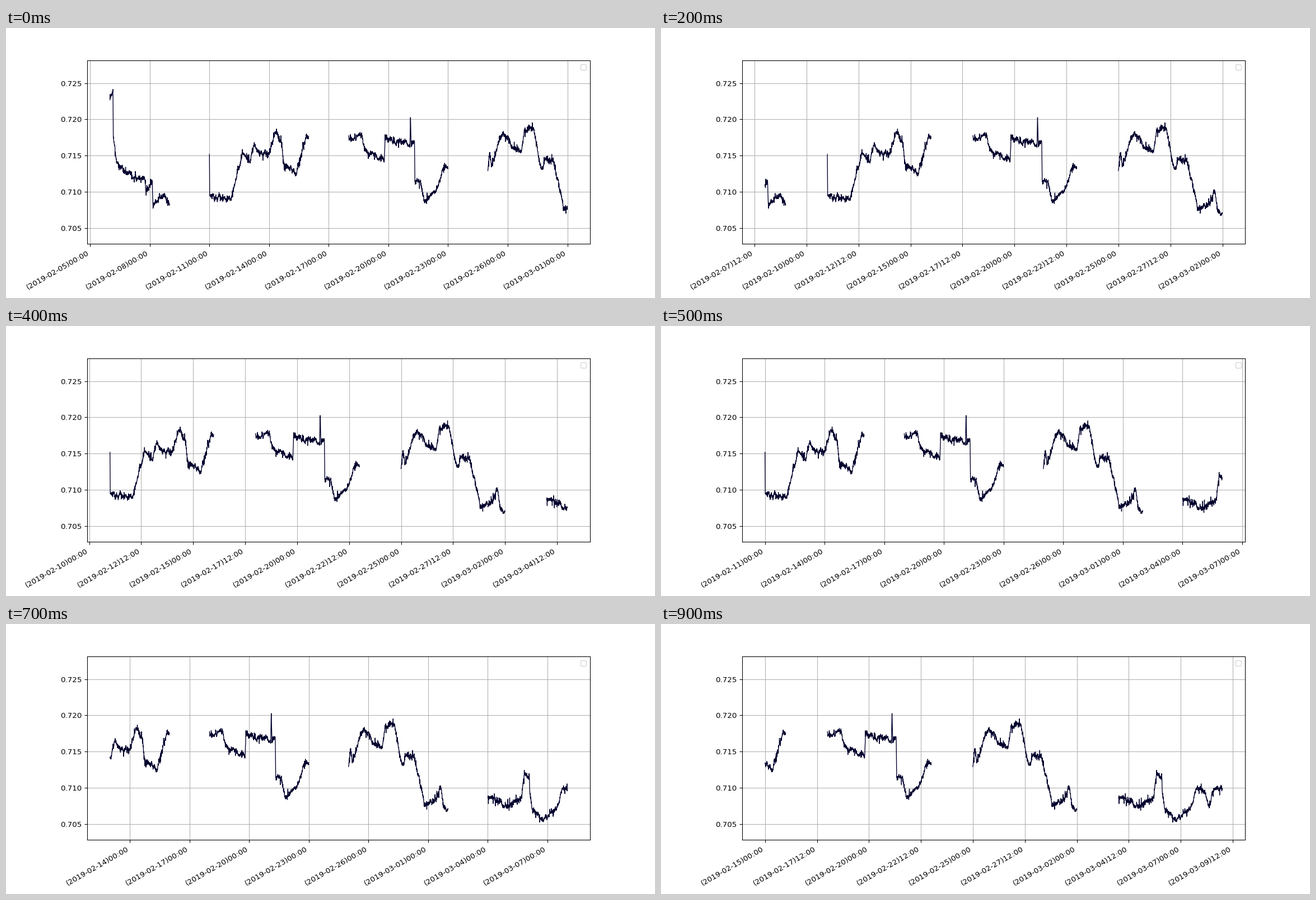
Animation of 1159x483 px, one loop 1 s. Source, as a matplotlib script:

```python
import matplotlib.pyplot as plt
import numpy as np
from matplotlib.animation import FuncAnimation

W, H, DPI = 1159, 483, 96.6
FRAMES, INTERVAL = 10, 100
FIRST_DAY, SPAN = 6, 23          # days counted from 1 February = 1
INK = "#02022e"

# First day of each trading week and its key levels: (hour, pips above 0.7).
WEEKS = [
    (6, [(0, 229), (3.6, 241), (4, 176), (8, 142), (24, 124), (42, 118),
         (43.5, 100), (51, 114), (51.8, 82), (65, 98), (72, 86)]),
    (11, [(0, 150), (.3, 91), (26, 91), (40, 153), (49, 139), (54, 169),
          (61, 153), (72, 152), (79, 184), (87.5, 166), (89, 140),
          (105, 126), (117, 179), (120, 172)]),
    (18, [(0, 172), (16, 176), (19, 159), (43, 142), (44, 174), (74, 165),
          (74.6, 208), (75.5, 168), (79.5, 168), (80, 110), (87, 116),
          (91.5, 87), (105, 102), (115, 135), (120, 133)]),
    (25, [(0, 130), (2, 153), (4.5, 137), (17, 179), (24, 176), (31, 156),
          (40, 154), (44, 182), (55, 190), (58, 163), (65, 128), (69, 145),
          (79, 140), (92, 79), (105, 80), (111, 104), (115, 72), (120, 71)]),
    (32, [(0, 88), (27, 74), (41, 88), (44, 117), (50, 118), (50.6, 94),
          (54, 71), (66, 57), (86, 75), (90, 100), (98, 98), (105, 74),
          (108, 96), (120, 100)]),
]


def market_noise(rng, size):
    """Slow mean-reverting wobble plus jagged jitter, in pips."""
    memory = 0.92 ** np.arange(60)
    wobble = np.convolve(rng.normal(0, 0.8, size + 59), memory, "valid")
    jitter = np.clip(1.3 * rng.standard_t(3, size), -8, 8)
    return wobble + jitter


def build_series():
    """Ten-minute quotes; NaN marks each weekend."""
    rng = np.random.default_rng(7)
    days, prices = [], []
    for start, levels in WEEKS:
        hours, pips = np.array(levels).T
        t = np.arange(0, hours[-1], 1 / 6)
        value = np.interp(t, hours, pips) + market_noise(rng, t.size)
        days += [start + t / 24, [np.nan]]
        prices += [0.7 + value * 1e-4, [np.nan]]
    return np.concatenate(days), np.concatenate(prices)


def date_label(day):
    month, date = (2, day) if day < 29 else (3, day - 28)
    hour = round(day % 1 * 24)
    return f"(2019-{month:02d}-{int(date):02d}){hour:02d}:00"


def date_ticks(lo, hi):
    step, offset = (2.5, 0) if (hi - lo) / 10 <= 2.5 else (3, 2)
    first = np.ceil((lo - offset) / step)
    return np.arange(first * step + offset, hi, step)


days, prices = build_series()

# The tiny surplus guards against rounding down to a smaller canvas.
fig = plt.figure(figsize=((W + 1e-4) / DPI, (H + 1e-4) / DPI), dpi=DPI)
ax = fig.add_axes([0.125, 0.2, 0.775, 0.68])
ax.set_ylim(0.70281, 0.72813)
ax.set_yticks(np.arange(0.705, 0.7251, 0.005))
ax.yaxis.set_major_formatter("{x:.3f}")
ax.grid(True)
ax.legend([], [], loc="upper right")
line, = ax.plot([], [], color=INK, lw=1)


def update(frame):
    start = FIRST_DAY + frame
    inside = (days >= start) & (days < start + SPAN)
    shown = inside | np.isnan(days)
    line.set_data(days[shown], prices[shown])

    first, last = days[inside].min(), days[inside].max()
    margin = 0.05 * (last - first)
    lo, hi = first - margin, last + margin
    ticks = date_ticks(lo, hi)
    ax.set_xticks(ticks, [date_label(d) for d in ticks],
                  rotation=30, ha="right")
    ax.set_xlim(lo, hi)
    return line,


anim = FuncAnimation(fig, update, frames=FRAMES, interval=INTERVAL,
                     repeat=True, repeat_delay=0, blit=False)
plt.show()
```
